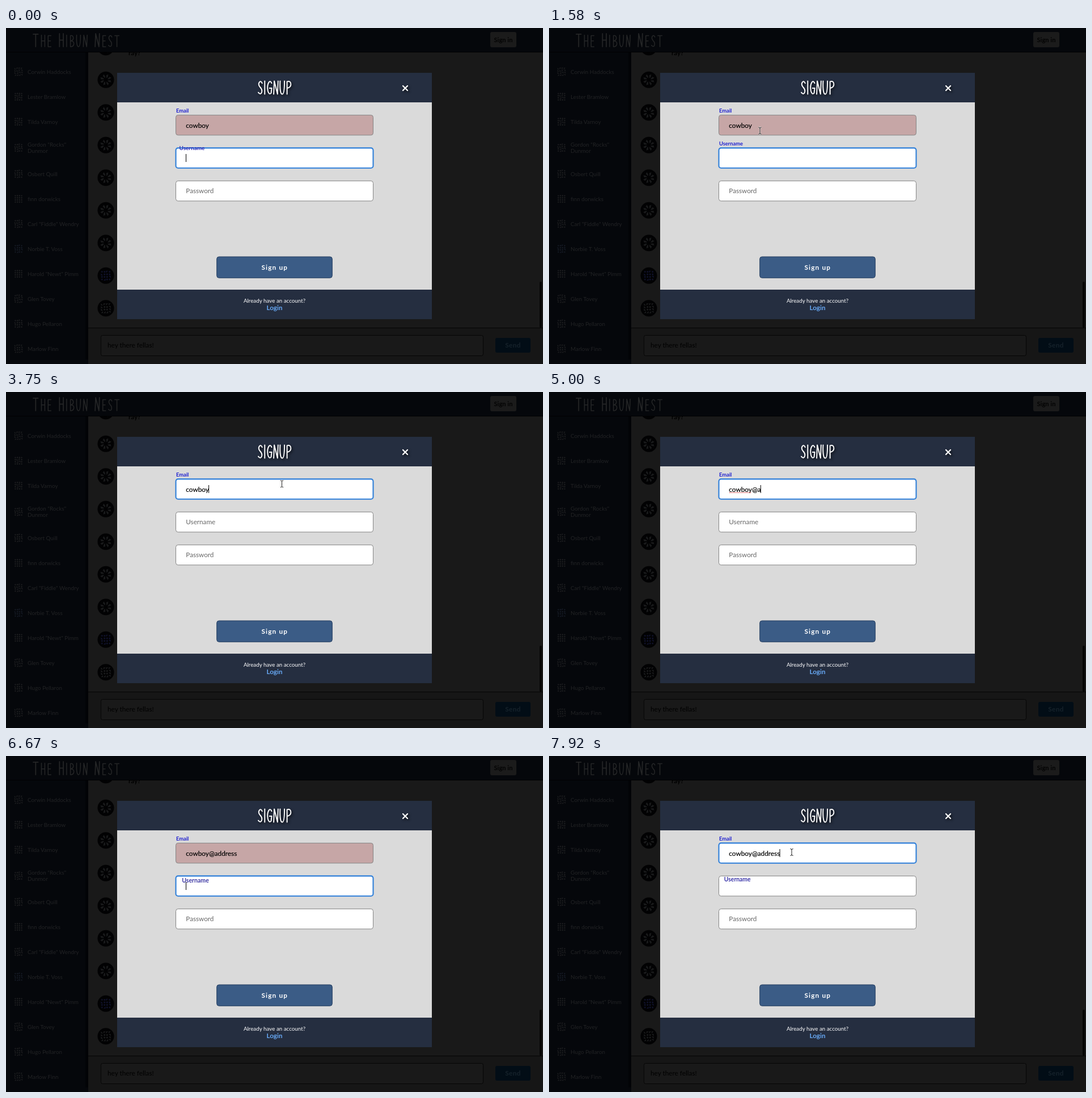
Write an HTML page that moves like this. It is 947x592 px and loops after 8 s.

```html
<!DOCTYPE html>
<html lang="en">
<head>
<meta charset="utf-8">
<title>Sign-up form</title>
<style>
  html, body { margin: 0; width: 100%; height: 100%; overflow: hidden; background: #191919; }
  svg { display: block; width: 947px; height: 592px; font-family: Lato, sans-serif; }
  .mid { text-anchor: middle; }
  .bold { font-weight: 700; }
</style>
</head>
<body>
<svg id="stage" viewBox="0 0 947 592" width="947" height="592"></svg>
<script>
const LOOP = 8000, STEP = 1000 / 12;
const BLUE = '#2f7fd9', GREY = '#858585';

// ---------- drawing helpers ----------
const rect = (x, y, w, h, fill, more = '') =>
  `<rect x="${x}" y="${y}" width="${w}" height="${h}" fill="${fill}" ${more}/>`;
const text = (s, x, y, size, fill, more = '') =>
  `<text x="${x}" y="${y}" font-size="${size}" fill="${fill}" ${more}>${s}</text>`;

// Tall hand-drawn capitals: [width, path] in a 24-unit high box
const GLYPHS = {
  S: [7, 'M7 4Q5 -1 2 2Q-1 6 3 11Q8 16 6 21Q4 26 0 21'],
  I: [2, 'M1 0V24'],
  G: [8, 'M8 4Q6 -1 3 2Q-1 8 1 18Q3 26 7 22L8 13H4'],
  N: [8, 'M0 24L1 0L7 24L8 0'],
  U: [8, 'M0 0Q-1 24 4 24Q8 24 8 0'],
  P: [8, 'M1 24V1Q8 -1 8 6Q8 12 1 13'],
  T: [9, 'M0 1H9M4.5 1V24'],
  H: [8, 'M1 0V24M8 0V24M1 12H8'],
  E: [7, 'M7 1H1V24H7M1 12H6'],
  B: [8, 'M1 24V1Q7 0 7 6Q7 11 1 12Q9 12 8 19Q7 24 1 24']
};
function lettering(str, x, base, gap, width, color, more = '') {
  let out = '';
  for (const ch of str) {
    if (ch === ' ') { x += 9; continue; }
    const [w, d] = GLYPHS[ch.toUpperCase()];
    const k = ch === ch.toUpperCase() ? 0.96 : 0.85;
    out += `<path d="${d}" transform="translate(${x} ${base - 24 * k}) scale(${k})"/>`;
    x += w * k + gap;
  }
  return `<g role="img" aria-label="${str}" fill="none" stroke="${color}" stroke-width="${width}"
    stroke-linecap="round" stroke-linejoin="round" ${more}>${out}</g>`;
}

// Avatar pattern: a few small shapes repeated in four quarter turns
function pattern(cx, cy, r, seed, color) {
  const rnd = n => { const v = Math.sin(seed * 127.1 + n * 311.7) * 43758.5; return v - Math.floor(v); };
  const shape = (x, y, s, n) => rnd(n) > 0.5
    ? `M${x - s} ${y}L${x} ${y - s}L${x + s} ${y}L${x} ${y + s}Z`
    : `M${x - s} ${y - s}h${2 * s}v${2 * s}Z`;
  const u = r / 4;
  const d = shape(3 * u, 3 * u, u * 0.8, 1) + shape(3 * u, -u, u * 0.85, 2)
    + shape(3 * u, u, u * 0.85, 3) + shape(u, u, u * 0.85, 4);
  return `<g transform="translate(${cx} ${cy})" fill="${color}">`
    + [0, 90, 180, 270].map(q => `<path d="${d}" transform="rotate(${q})"/>`).join('') + '</g>';
}
function rosette(cx, cy, color) {
  let out = '';
  for (let i = 0; i < 8; i++)
    out += `<path d="M3 0L8 -2.4L10.5 0.6L6 1.4Z" transform="rotate(${i * 45 + 22})"/>`;
  return `<g transform="translate(${cx} ${cy})" fill="${color}">${out}</g>`;
}

// ---------- dimmed chat page ----------
function page() {
  const people = ['Corwin Haddocks', 'Lester Bramlow', 'Tilda Varnoy', 'Gordon "Rocks"|Dunmor',
    'Osbert Quill', 'finn dorwicks', 'Carl "Fiddle" Wendry', 'Norbie T. Voss',
    'Harold "Newt" Pimm', 'Glen Tovey', 'Hugo Pellaron', 'Marlow Finn'];
  let s = rect(0, 0, 947, 592, '#191919');
  for (let i = 0; i < 9; i++) {
    const y = 33.8 + i * 57.5;
    s += `<circle cx="176" cy="${y}" r="14.5" fill="#020203"/>`;
    s += i < 7 ? rosette(176, y, '#191a1b') : pattern(176, y, 9, i + 4, i === 7 ? '#10122a' : '#1b1c1d');
  }
  s += text('ray?', 216, 48, 11.5, '#000', 'class="bold"');
  s += rect(0, 43, 145, 549, '#05070b') + rect(140, 43, 5, 541, '#020306');
  people.forEach((name, i) => {
    const y = 77 + i * 44 + Math.max(0, Math.min(4, 2 * (i - 2)));
    const lines = name.split('|');
    s += pattern(22, y, 7.5, i + 1, i === 7 ? '#151a24' : '#1c1d1f');
    lines.forEach((line, n) => {
      s += text(line, 38, y + 3.5 + (n - (lines.length - 1) / 2) * 11.6, 9.9, '#222325');
    });
  });
  s += rect(0, 0, 947, 43, '#05070b') + rect(0, 42, 947, 1, '#010102');
  s += lettering('The Hibun Nest', 48, 33, 5, 1.8, '#252627');
  s += rect(854, 7, 46, 27, '#1b1b1b', 'rx="3"') + text('Sign in', 877, 25, 11.2, '#040404', 'class="mid bold"');
  s += rect(941, 447, 4, 81, '#050505', 'rx="2"');
  s += rect(145, 528, 802, 64, '#161616') + rect(145, 528, 802, 1, '#040404');
  s += rect(167.5, 541.5, 674, 36, '#191919', 'rx="3" stroke="#050505"');
  s += text('hey there fellas!', 179, 563, 11.8, '#000');
  s += rect(863, 546, 62, 26, '#020d16', 'rx="3"');
  s += text('Send', 894, 563, 11.8, '#16222b', 'class="mid bold" letter-spacing=".4"');
  return s;
}

// ---------- dialog ----------
const field = (id, y) => rect(299.5, y + .4, 348, 35.4, '#fff', `id="${id}" rx="4" stroke="${GREY}"`);
const caret = id => rect(0, 0, 1, 14, '#000', `id="${id}"`);
function dialog() {
  const ibeam = 'M-2.6 -6Q0 -6 0 -4.3Q0 -6 2.6 -6M0 -4.6V4.6M-2.6 6Q0 6 0 4.3Q0 6 2.6 6';
  const shadow = 'style="filter:drop-shadow(2px 2px 2px rgba(0,0,0,.75))"';
  return rect(196, 79, 555, 434, '#dadada')
    + rect(196, 79, 555, 52, '#252e40') + rect(196, 461, 555, 52, '#252e40')
    + lettering('SIGNUP', 445, 116.5, 3.6, 2, '#fff', shadow)
    + `<path d="M700 102L708 110M708 102L700 110" stroke="#fff" stroke-width="2.3" stroke-linecap="round" ${shadow}/>`
    + text('Email', 300, 149.3, 9.3, '#2020cf', 'class="bold"')
    + field('emailBox', 153) + field('userBox', 211) + field('passBox', 269)
    + text('', 317.3, 175.6, 11.8, '#000', 'id="email" stroke="#000" stroke-width=".18"')
    + '<path id="squiggle" d="M318 177.3H356" stroke="#d8383a" stroke-width="1.3" stroke-dasharray="1.4 1.2"/>'
    + text('Username', 0, 0, 11.8, '#666', 'id="label"')
    + text('Password', 317.3, 291.3, 11.7, '#666')
    + caret('emailCaret') + caret('userCaret')
    + rect(371.7, 403, 203.6, 37.3, '#3b5c86', 'rx="4" stroke="#263f61"')
    + text('Sign up', 473.8, 425.6, 11.8, '#fff', 'class="mid bold" letter-spacing="1.15"')
    + text('Already have an account?', 473.5, 484, 9.8, '#fff', 'class="mid"')
    + text('Login', 473.5, 497, 11.6, '#67a8f4', 'class="mid bold"')
    + `<g id="beam" fill="none"><path d="${ibeam}" stroke="#fff" stroke-opacity=".6" stroke-width="2.4"/>
       <path d="${ibeam}" stroke="#222" stroke-width="1"/></g>`
    + '<path id="arrow" d="M0 0V11L2.6 8.6L4.3 12.4L6 11.6L4.3 8H7.8Z" fill="#000" stroke="#fff" stroke-width=".8"/>';
}

const stage = document.getElementById('stage');
stage.innerHTML = page() + dialog();
const el = {};
stage.querySelectorAll('[id]').forEach(n => { el[n.id] = n; });
const set = (node, attrs) => { for (const k in attrs) node.setAttribute(k, attrs[k]); };
const show = (node, on) => node.setAttribute('visibility', on ? 'visible' : 'hidden');

// ---------- motion ----------
const clamp = v => Math.max(0, Math.min(1, v));
const mix = (a, b, p) => a + (b - a) * p;
// CSS "ease": cubic-bezier(.25,.1,.25,1)
function ease(x) {
  if (x <= 0 || x >= 1) return clamp(x);
  let lo = 0, hi = 1, u = 0;
  for (let i = 0; i < 24; i++) {
    u = (lo + hi) / 2;
    const bx = .75 * u * (1 - u) + u * u * u;
    if (bx < x) lo = u; else hi = u;
  }
  return .3 * u * (1 - u) ** 2 + 3 * u * u * (1 - u) + u ** 3;
}

const NAME = 'cowboy', TAIL = '@address';
const KEYS = [4330, 5000, 5165, 5330, 5665, 5748, 5915, 6080];
const CLICK = 1604, TAB = 6580, CLICK2 = 7827, FLOAT = 300;
const PATH = [[80, 640, 455], [830, 600, 412], [1480, 372, 181], [3400, 372, 181],
  [3830, 498, 160], [6740, 498, 160], [7500, 427, 167], [7833, 427, 168], [7917, 428, 169.5]];

const blink = (t, since) => Math.floor((t - since) / 500) % 2 === 0;

function floatAmount(t) {
  const at = start => ease((t - start) / FLOAT);
  if (t < CLICK) return at(-120);
  if (t < TAB) return 1 - at(CLICK);
  return t < CLICK2 ? at(6592) : 1 - at(CLICK2);
}

function pointer(t) {
  let i = 0;
  while (i < PATH.length - 2 && t >= PATH[i + 1][0]) i++;
  const [t0, x0, y0] = PATH[i], [t1, x1, y1] = PATH[i + 1];
  let p = clamp((t - t0) / (t1 - t0));
  p = p * p * (3 - 2 * p);
  return [mix(x0, x1, p), mix(y0, y1, p)];
}

function styleField(box, focused, fill) {
  set(box, { fill, stroke: focused ? BLUE : GREY, 'stroke-width': focused ? 2.1 : 1 });
}

function draw(t) {
  const emailOn = (t >= CLICK && t < TAB) || t >= CLICK2;
  const typed = KEYS.filter(k => t >= k).length;

  styleField(el.emailBox, emailOn, emailOn ? '#fff' : '#c6a6a6');
  styleField(el.userBox, !emailOn, '#fff');
  el.email.textContent = NAME + TAIL.slice(0, typed);
  show(el.squiggle, emailOn && typed && t < TAB);

  const lastKey = t >= CLICK2 ? CLICK2 : typed ? KEYS[typed - 1] - 20 : CLICK;
  set(el.emailCaret, { x: 317 + el.email.getComputedTextLength() - .5, y: 164 });
  show(el.emailCaret, emailOn && blink(t, lastKey));
  set(el.userCaret, { x: 317, y: 222 });
  show(el.userCaret, !emailOn && blink(t, t < CLICK ? -120 : 6575));

  const p = floatAmount(t), up = p > .1;
  const size = up ? mix(11.4, 9.3, p) : 11.7;
  const tint = up ? [mix(85, 32, p), mix(75, 32, p), mix(135, 207, p)] : [102, 102, 102];
  set(el.label, {
    x: mix(317.3, 300, p), y: mix(229.4, 203.9, p) + size * .345,
    'font-size': size, 'font-weight': up ? 700 : 400,
    fill: `rgb(${tint.map(Math.round)})`
  });

  const [x, y] = pointer(t);
  const visible = (t >= 80 && t < KEYS[0]) || t >= 6740;
  const inField = x > 299 && x < 648 && [153, 211, 269].some(top => y > top && y < top + 36);
  for (const [node, on] of [[el.beam, inField], [el.arrow, !inField]]) {
    set(node, { transform: `translate(${x} ${y})` });
    show(node, visible && on);
  }
}

const start = performance.now();
function tick() {
  const t = (performance.now() - start) % LOOP;
  draw(Math.floor((t + 4) / STEP) * STEP % LOOP);
  requestAnimationFrame(tick);
}
tick();
</script>
</body>
</html>
```
